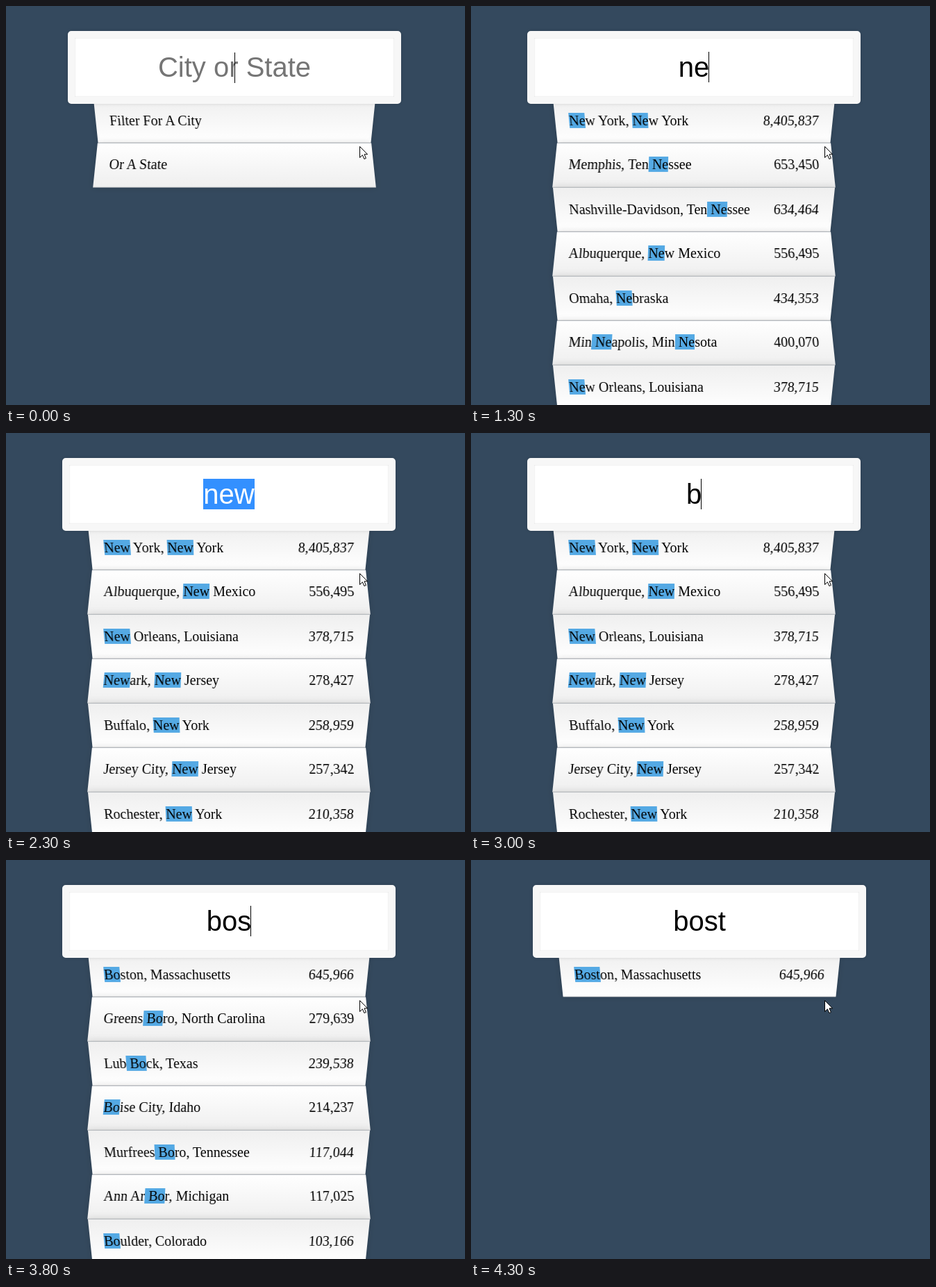
Animation of 661 by 575 pixels, one loop 4900 ms. Source, as an HTML page:

```html
<!DOCTYPE html>
<html lang="en">
<head>
<meta charset="utf-8">
<title>City search</title>
<style>
  * { box-sizing: border-box; }
  html, body { margin: 0; width: 100%; height: 100%; overflow: hidden; background: #34495e; }
  #stage { position: relative; width: 661px; height: 575px; overflow: hidden; background: #34495e; }

  #field {
    position: absolute; z-index: 2; left: 89px; top: 36px; width: 480px; height: 105px;
    padding: 20px; border: 10px solid #f7f7f7; border-radius: 5px; background: #fff;
    box-shadow: 0 0 5px rgba(0, 0, 0, .12), inset 0 0 2px rgba(0, 0, 0, .19);
    font: 40px/45px "Liberation Sans", Arial, sans-serif; text-align: center; white-space: pre;
  }
  #field .hint { color: #757575; }
  #field .picked { background: #3390ff; color: #fff; }
  #caret { position: absolute; z-index: 3; width: 1px; height: 44px; background: #000; }

  #list {
    position: absolute; left: 129px; top: 131px; width: 400px; margin: 0; padding: 0;
    list-style: none; font: 20px/23px "Liberation Serif", "Times New Roman", serif;
  }
  #list li {
    display: flex; justify-content: space-between; height: 64px; padding: 20px;
    border-bottom: 1px solid #d8d8d8; box-shadow: 0 0 10px rgba(0, 0, 0, .14);
    text-transform: capitalize; white-space: nowrap;
  }
  #list li:nth-child(odd) {
    transform: perspective(100px) rotateX(-3deg) translateY(3px);
    background: linear-gradient(to top, #fff, #efefef);
  }
  #list li:nth-child(even) {
    transform: perspective(100px) rotateX(3deg) translateY(2px) scale(1.001);
    background: linear-gradient(to bottom, #fff, #efefef);
  }
  .hl { background: #54a9e4; }

  #pointer { position: absolute; z-index: 4; left: 509px; top: 202px; }

  /* the page is narrower while a scrollbar is needed */
  .long #field { left: 81px; }
  .long #list { left: 120.5px; }
</style>
</head>
<body>
<div id="stage">
  <div id="field"></div>
  <div id="caret"></div>
  <ul id="list"></ul>
  <svg id="pointer" width="14" height="21" viewBox="0 0 14 21">
    <path d="M.5 .5V16.5L4.4 12.8L6.9 18.5L9.4 17.4L7 11.8H11.6Z" fill="#fff" stroke="#000"/>
  </svg>
</div>
<script>
  const LOOP = 4900;

  const cities = `New York, New York|8,405,837
Los Angeles, California|3,884,307
Chicago, Illinois|2,718,782
Houston, Texas|2,195,914
Philadelphia, Pennsylvania|1,553,165
Phoenix, Arizona|1,513,367
San Antonio, Texas|1,409,019
Columbus, Ohio|822,553
Memphis, Tennessee|653,450
Boston, Massachusetts|645,966
Nashville-Davidson, Tennessee|634,464
Baltimore, Maryland|622,104
Albuquerque, New Mexico|556,495
Long Beach, California|469,428
Virginia Beach, Virginia|448,479
Omaha, Nebraska|434,353
Minneapolis, Minnesota|400,070
New Orleans, Louisiana|378,715
Greensboro, North Carolina|279,639
Newark, New Jersey|278,427
Buffalo, New York|258,959
Jersey City, New Jersey|257,342
Lubbock, Texas|239,538
Boise City, Idaho|214,237
Rochester, New York|210,358
Yonkers, New York|199,766
Murfreesboro, Tennessee|117,044
Ann Arbor, Michigan|117,025
Boulder, Colorado|103,166
Bossier City, Louisiana|66,333`.split('\n').map(line => line.split('|'));

  // start time, typed text, filter in the list, caret x (0 = hidden), text selected
  const steps = [
    [0, '', '', 329],
    [900, 'n', 'n', 331],
    [1100, 'ne', 'n', 342],
    [1300, 'ne', 'ne', 342],
    [1400, 'new', 'ne', 357],
    [1500, 'new', 'new', 357],
    [1700, 'new', 'new', 0],
    [2000, 'new', 'new', 357],
    [2300, 'new', 'new', 0, true],
    [3000, 'b', 'new', 331],
    [3100, 'b', 'b', 331],
    [3300, 'bo', 'b', 342],
    [3400, 'bo', 'bo', 342],
    [3600, 'bo', 'bo', 0],
    [3800, 'bos', 'bo', 352],
    [3900, 'bos', 'bos', 360],
    [4000, 'bost', 'bos', 367],
    [4100, 'bost', 'bost', 367],
    [4300, 'bost', 'bost', 0]
  ];

  const [stage, field, caret, list] =
    ['stage', 'field', 'caret', 'list'].map(id => document.getElementById(id));

  function rows(query) {
    if (!query) return ['Filter for a city', 'or a state'].map(text => `<li>${text}</li>`);
    const match = new RegExp(query, 'gi');
    return cities
      .filter(([place]) => place.toLowerCase().includes(query))
      .slice(0, 8)
      .map(([place, people]) => {
        const name = place.replace(match, `<span class="hl"> ${query}</span>`);
        return `<li><span>${name}</span><span>${people}</span></li>`;
      });
  }

  function show([, text, query, caretX, picked]) {
    const items = rows(query);
    stage.className = items.length > 5 ? 'long' : '';
    list.innerHTML = items.join('');
    field.innerHTML = text
      ? `<span class="${picked ? 'picked' : ''}">${text}</span>`
      : '<span class="hint">City or State</span>';
    caret.style.display = caretX ? 'block' : 'none';
    caret.style.left = caretX + 'px';
    caret.style.top = (text ? 66 : 67) + 'px';
  }

  let current;
  function tick() {
    const time = performance.now() % LOOP;
    const step = steps.filter(([start]) => start <= time).pop();
    if (step !== current) show(current = step);
    requestAnimationFrame(tick);
  }
  tick();
</script>
</body>
</html>
```
